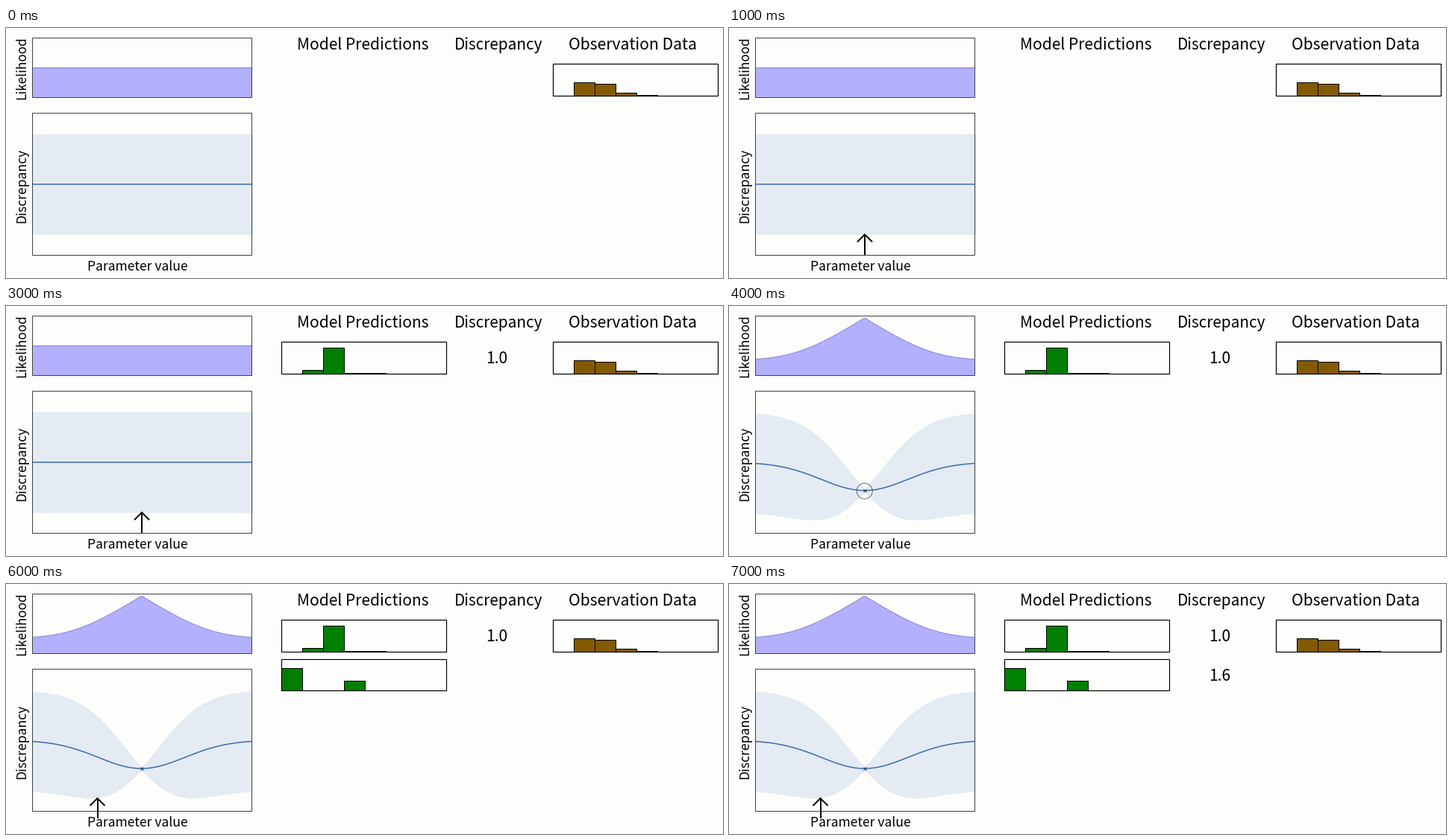
A matplotlib script for the animation above (8000 ms loop, 961x336 px).

```python
import math
import numpy as np
import matplotlib.pyplot as plt
from matplotlib.animation import FuncAnimation
from matplotlib.patches import Circle, Rectangle

W, H, DPI = 961, 336, 64
PT = 72 / DPI  # points per pixel
BG, INK = "#fdfefc", "black"
LEFT, RIGHT, MID = 35, 329, 181.7
BASE, MEAN = 93.4, 210  # likelihood zero line, prior mean
BAR = 28

plt.rcParams["font.family"] = ["Noto Sans CJK JP", "DejaVu Sans"]
fig = plt.figure(figsize=(W / DPI, H / DPI), dpi=DPI, facecolor=BG)
ax = fig.add_axes([0, 0, 1, 1])
ax.set_xlim(0, W)
ax.set_ylim(H, 0)
ax.axis("off")


def label(x, y, text, size, rotation=0):
    return ax.text(x, y, text, size=size * PT, color=INK, rotation=rotation,
                   rotation_mode="anchor", ha="center", va="baseline")


def box(x0, y0, x1, y1, fill="none", edge=INK, width=1.0, z=3):
    return ax.add_patch(Rectangle((x0, y0), x1 - x0, y1 - y0, facecolor=fill,
                                  edgecolor=edge, linewidth=width * PT, zorder=z))


def line(x, y, color, width, z=2):
    return ax.plot(x, y, color=color, lw=width * PT, zorder=z,
                   solid_capstyle="butt", solid_joinstyle="miter")[0]


def histogram(x, top, heights, color):
    base = top + 42.6
    bars = [box(x + i * BAR, base - h, x + (i + 1) * BAR, base, color)
            for i, h in heights.items()]
    return bars + [box(x, top, x + 221, base, width=1.2, z=4)]


def arrow(x, top):
    return [line([x, x], [top + 28, top + 0.5], INK, 2, 5),
            line([x - 10, x, x + 10], [top + 11, top + 1, top + 11], INK, 2, 5)]


def curves(x, mean, half, like):
    """Likelihood area, uncertainty band and mean line."""
    band = ax.fill_between(x, mean - half, mean + half, facecolor="#e4ebf3",
                           edgecolor="#dce6ef", lw=0.8 * PT, zorder=1)
    area = ax.fill_between(x, BASE, BASE - like, facecolor="#b3b0fd", lw=0, zorder=1)
    return [band, area, line(x, BASE - like, "#8d88dc", 1.1),
            line(x, mean, "#3a6bae", 1.5)]


# Gaussian process before and after one observation at MID
x = np.linspace(LEFT, RIGHT, 295) + 0.5
k = np.exp(-((x - MID) / 58) ** 2 / 2)
flat = np.zeros_like(x)
prior = curves(x, flat + MEAN, flat + 67, flat + 40.5)

spread = np.sqrt(1 - 0.998 * k ** 2)
z = 38 * (1 - k) / (34 * spread)
like = 77 * np.array([math.erfc(v / math.sqrt(2)) for v in z])
posterior = curves(x, MEAN + 38 * k, 67 * spread, like)
posterior.append(ax.plot(MID, 248.2, "x", color="#1d3557", ms=3.5 * PT,
                         mew=1 * PT, zorder=4)[0])

box(LEFT, 13, RIGHT, 93, edge="#404040")
box(LEFT, 114, RIGHT, 305, edge="#404040")
label(26.6, 53.2, "Likelihood", 17.2, 90)
label(26.6, 211.8, "Discrepancy", 17.6, 90)
label(176, 325.5, "Parameter value", 17.5)
label(478, 29, "Model Predictions", 21)
label(660, 29, "Discrepancy", 20.8)
label(840, 29, "Observation Data", 21.1)
histogram(733, 48, {1: 17.4, 2: 15.4, 3: 3.4, 4: 0.6}, "#845a00")

ring = ax.add_patch(Circle((MID, 248.7), 10.5, fill=False, ec="#444444",
                           lw=0.75 * PT, zorder=4))

# (artists, first second, end second)
schedule = [
    (prior, 0, 4),
    (posterior, 4, 8),
    (arrow(182, 276.5), 1, 4),
    (histogram(369, 48, {1: 4.4, 2: 34.8, 3: 0.9, 4: 0.5}, "#008000"), 2, 8),
    ([label(658, 77, "1.0", 21.2)], 3, 8),
    ([ring], 4, 5),
    (arrow(122.5, 287), 5, 8),
    (histogram(369, 100.7, {0: 30, 3: 13}, "#008000"), 6, 8),
    ([label(658, 130, "1.6", 21.2)], 7, 8),
]


def update(second):
    for artists, start, end in schedule:
        for artist in artists:
            artist.set_visible(start <= second < end)
    return []


anim = FuncAnimation(fig, update, frames=8, interval=1000, repeat=True,
                     repeat_delay=0, blit=False)
plt.show()
```
